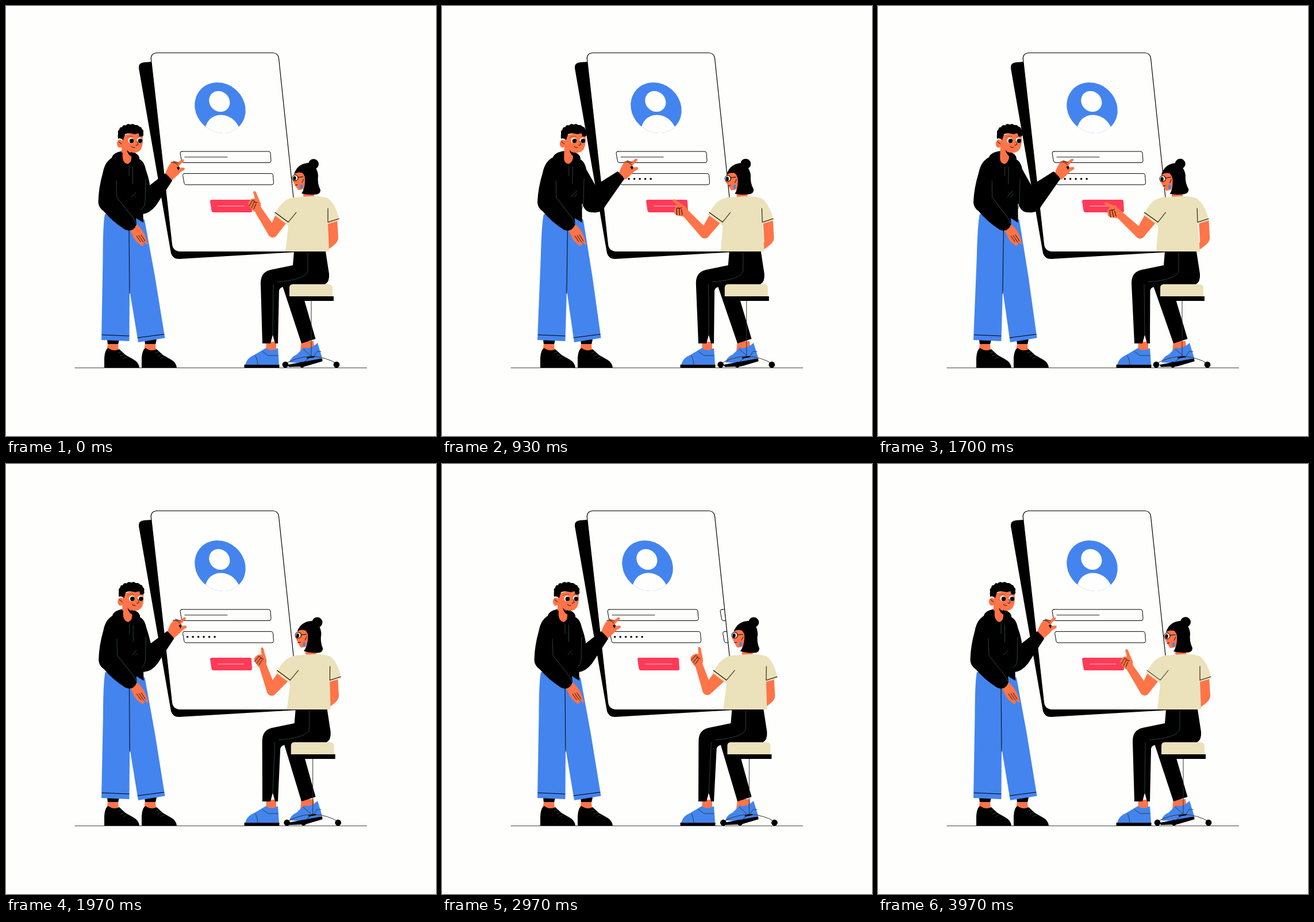
Animation, 748 px wide and 748 px high, one loop 4.01 s. Source, as an HTML page with a canvas:

```html
<!DOCTYPE html>
<html lang="en">
<head>
<meta charset="utf-8">
<title>Sign in together</title>
<style>
  html, body { margin: 0; width: 100%; height: 100%; overflow: hidden; background: #fefefd; }
  canvas { display: block; width: 100%; height: 100%; }
</style>
</head>
<body>
<canvas id="stage" width="748" height="748"></canvas>
<script>
const ctx = document.getElementById('stage').getContext('2d');
const LOOP = 4010;
const BLACK = '#000', WHITE = '#fefefd', BLUE = '#4484ee', SKIN = '#ff7448',
      RED = '#ff3b58', CREAM = '#ebe1ba', SEAM = '#24463f';

// ---------- drawing helpers ----------
function fill(d, color) {
  ctx.fillStyle = color;
  ctx.fill(new Path2D(d));
}
function line(d, color = BLACK, width = 1) {
  ctx.strokeStyle = color;
  ctx.lineWidth = width;
  ctx.stroke(new Path2D(d));
}
function oval(x, y, rx, ry, color) {
  ctx.fillStyle = color;
  ctx.beginPath();
  ctx.ellipse(x, y, rx, ry, 0, 0, 7);
  ctx.fill();
}
const dot = (x, y, r, color) => oval(x, y, r, r, color);

function group(draw, ...matrix) {
  ctx.save();
  if (matrix.length) ctx.transform(...matrix);
  draw();
  ctx.restore();
}
const shift = (dx, draw, dy = 0) => group(draw, 1, 0, 0, 1, dx, dy);
// shifts x by k for each unit above base
const lean = (k, base, draw, dx = 0) => group(draw, 1, 0, -k, 1, k * base + dx, 0);

// tapered segment with round ends
function limb(x1, y1, r1, x2, y2, r2, color) {
  const a = Math.atan2(y2 - y1, x2 - x1);
  ctx.fillStyle = color;
  ctx.beginPath();
  ctx.arc(x1, y1, r1, a + Math.PI / 2, a - Math.PI / 2);
  ctx.arc(x2, y2, r2, a - Math.PI / 2, a + Math.PI / 2);
  ctx.fill();
}

// ---------- timing helpers ----------
const clamp = v => Math.min(1, Math.max(0, v));
const smooth = v => v * v * (3 - 2 * v);
const cubic = v => v < .5 ? 4 * v ** 3 : 1 - 4 * (1 - v) ** 3;

function track(keys, t) {
  let i = 1;
  while (i < keys.length - 1 && t > keys[i][0]) i++;
  const [t0, a] = keys[i - 1], [t1, b] = keys[i];
  const p = smooth(clamp((t - t0) / (t1 - t0)));
  return a.map((v, n) => v + (b[n] - v) * p);
}
const blink = (t, times) => Math.max(0, ...times.map(c => 1 - Math.abs(t - c) / 95));

// ---------- card ----------
const CARD = 'M263 81.5H464Q473 81.5 474.5 91L510 427.5H303Q290 427 288.5 415L252.5 94Q251 82 263 81.5Z';
const FIELD = 'M306 253H457Q459.5 253 460 256L461 269Q461 272.5 458 272.5H309Q306 272.5 305.5 270L303 256Q303 253 306 253Z';

function form(dots) {
  group(() => {
    dot(0, 0, 44, BLUE);
    ctx.beginPath();
    ctx.arc(0, 0, 44, 0, 7);
    ctx.clip();
    dot(0, 43, 30.5, WHITE);
    dot(0, -11, 18, WHITE);
  }, 1, 0, .107, 1, 372.5, 177);
  line(FIELD);
  line('M311 262.8H385', BLACK, .9);
  shift(4.5, () => line(FIELD), 38.4);
  for (let i = 0; i < dots; i++) dot(315.6 + 9.5 * i, 300.8, 1.8, BLACK);
  fill('M358 337H424Q427 337 427 340L428 356Q428 359 425 359H361Q358 359 357.5 356L355 340Q355 337 358 337Z', RED);
  line('M369 348H414', '#ffc4ca', 1.2);
}

function card(t) {
  fill('M231 108Q230 99 240 98L254 97L300 420L505 428L301 440Q290 440 287 430Z', BLACK);
  fill(CARD, WHITE);
  group(() => {
    ctx.clip(new Path2D(CARD));
    const slide = 196 * cubic(clamp((t - 2800) / 640));
    const typed = Math.floor((t - 380) / 85) + 1;
    shift(-slide, () => form(Math.min(6, typed)));
    if (slide) shift(196 - slide, () => form(0));
  });
  line(CARD, BLACK, 1.2);
}

// ---------- man ----------
const MAN = [[0, [0]], [200, [-.45]], [570, [.58]], [900, [1]], [1730, [1]], [2150, [-.45]], [2330, [0]], [LOOP, [0]]];

function manFoot() {
  fill('M176 580H197L195 589H177Z', BLACK);
  fill('M177 588H195L196 600H175Z', SKIN);
  fill('M171 629V612Q172 597 178 595Q187 602 197 597L208 607L222 615Q231 620 232 629Z', BLACK);
  line('M195 604L201 601M199 609L206 606M204 613L211 610', SEAM);
}

function manLegs() {
  fill('M172 362Q168.500 380 168.500 440L166 581L214.500 583L215 494L230 585L276.500 577.500L259 470L241 372L228 362Z', BLUE);
  line('M214 388L215 500M167 572L214 574M229 577L275 571');
}

function manEye(x, lid) {
  if (lid > .85) return line(`M${x - 5} 231Q${x} 229 ${x + 4} 233`, BLACK, .9);
  group(() => {
    ctx.beginPath();
    ctx.ellipse(x, 234 + lid * 1.5, 5, 5 * (1 - lid), 0, 0, 7);
    ctx.clip();
    dot(x, 234, 7, WHITE);
    dot(x + 1.2, 234.8, 4, BLACK);
  });
}

function manHead(lid) {
  oval(198, 239.5, 5, 7, SKIN);
  fill('M202 226Q220 219 237 223Q240 238 235 249Q229 257 219 255L217 274Q208 279 201 270V245Z', SKIN);
  fill('M210 250Q214 256 221 255.500L218.500 262Q212 259 210 250Z', BLACK);
  manEye(217.5, lid);
  manEye(232.5, lid);
  line('M210 229Q215 225 221 227M229 228L236 226', '#a8402a', .9);
  line('M228 235L230 240Q229 243 226 242M218 244Q220 247 224 246M196 236L201 240', BLACK, .9);
  fill('M195 231Q193 215 203 210Q217 203 231 209Q240 214 238 224Q231 220 224 223Q213 220 207 223L204 233Q199 229 195 231Z', BLACK);
  for (let i = 0; i < 10; i++) {
    const a = Math.PI * (.92 + i * .127);
    dot(217 + 18.5 * Math.cos(a), 221 + 12 * Math.sin(a), 4, BLACK);
  }
}

function manTorso(u, lid) {
  fill('M215 388L228 380Q238 389 243 402L247 414Q245 417 241 410L238 418Q228 413 222 403Z', SKIN);
  line('M227 400L234 410M231 399L239 411M235 398L242 409', BLACK, .9);
  fill('M188 262Q172 269 168.500 290Q161 316 160.500 341Q161 351 170 357Q184 374 207 389Q221 395 227 380L226 369L239 377L238 345L250 310Q245 280 230 264Z', BLACK);
  shift(1.5 * u, () => oval(208, 265, 24, 13, BLACK));
  shift(4 * u, () => manHead(lid));
  shift(1.5 * u, () => fill('M203 255Q185 257 183 269Q195 287 214 283Q232 280 232 264Q228 256 217 254Q223 268 212 275Q201 273 203 255Z', BLACK));
  line('M192 304L193 333L216 362Q224 371 226 379M214 278V295M220.500 280V309M219 332L232 318M225 332L229 327', SEAM);
}

function manArm(u) {
  const e = 28 * u, s = 8 * u, y = 3 * u;
  fill(`M${226 + s} 264Q${240 + s} 267 ${243 + s} 284L${250 + e * .6} 312
    L${277 + e} ${291 - y}Q${286 + e} ${294 - y} ${289 + e} ${304 - y}
    L${261 + e * .85} 347Q${250 + e} 361 ${237 + e * .95} ${362 - y}Q${229 + e * .8} 360 ${227 + e * .7} 350L${226 + s} 320Z`, BLACK);
  line(`M${243 + s * .5} 301L${242 + s * .5} 342Q${241 + s * .5} 350 ${235 + s} 354`, SEAM);
  shift(30.5 * u, () => {
    fill('M277.500 291Q282 277 288 272Q293 269 299 272L306 267Q311 266 309 270L302 277L299 282L309 281Q313 283 309 286Q303 288 300 293L289 303Z', SKIN);
    fill('M297 281Q302 277 302 282L300 286Z', BLACK);
    line('M287 272Q294 271 299 277M291 270L300 273', BLACK, .9);
  }, -u);
}

function man(t) {
  const [u] = track(MAN, t);
  const lid = blink(t, [570, 2375, 3315]);
  manFoot();
  shift(65, manFoot);
  lean(.023 * u, 580, () => {
    manLegs();
    manTorso(u, lid);
  });
  manArm(u);
}

// ---------- woman ----------
// seat, shoulders, elbow x y, wrist x y, hand turn, head shift, head turn
const REST  = [0, 0, 464, 394, 437, 352, 0, 0, 0];
const BACK  = [4, 6, 464, 394, 454, 346, .38, 6.5, .08];
const PRESS = [-2, -5, 456, 396, 418, 361, -.72, -6, -.06];
const SWIPE = [0, -5, 449, 389, 407, 361, -.72, -5, -.12];
const WOMAN = [[0, REST], [320, BACK], [570, REST], [840, PRESS], [1250, BACK], [1695, PRESS], [2090, BACK],
  [2330, [0, .5, 464, 394, 440, 351, .03, 0, 0]], [2560, PRESS], [2880, BACK], [3240, SWIPE], [3590, BACK], [3880, REST], [LOOP, REST]];

function womanLegs(c) {
  fill('M514 583H535L537 598L512 600Z', SKIN);
  fill('M493 620Q495 611 506 606L518 594Q529 598 542 586L550 612L530 622Z', BLUE);
  fill('M490 624L550 613L550.500 618L520 627L492 628Z', BLACK);
  line('M517 597L530 608M534 612L541 601L548 601', SEAM);
  fill('M453 584H470V600H452Z', SKIN);
  fill('M416 624Q419 612 432 607L452 595Q461 602 473 595L475 624Z', BLUE);
  fill('M414.500 624H475.500V629H414.500Z', BLACK);
  line('M446 601L456 608H473M434 608Q438 616 438 624', SEAM);
  fill(`M${481 + c} 487L${503 + c} 480L${519 + c * .3} 512L538.500 579L514 587Z`, BLACK);
  fill(`M${501 + c} 427H${556 + c}L${562 + c} 466Q${563 + c} 480 ${555 + c} 484L${493 + c} 489
    Q${477 + c} 486 ${475 + c * .8} 495L473 587H468L464 572L460 587H446L${443 + c} 482
    Q${443 + c} 463 ${460 + c} 459L${499 + c} 451Z`, BLACK);
  line(`M${525 + c} 430V460Q${523 + c} 476 ${472 + c} 480M${465 + c} 484L464 572`, SEAM);
}

function chair() {
  line('M531 513V610M486 622Q505 611 531 609Q558 611 575 622M531 609L515 622', '#333');
  line('M524 612L536 610', BLACK, 2);
  fill('M493 505V490Q493 484 499 484H561Q568 484 568 491V505Z', CREAM);
  fill('M493 505H570V513H497Z', BLACK);
  dot(486, 624, 5.4, BLACK);
  dot(515, 624, 5, BLACK);
  dot(575, 624, 5.4, BLACK);
}

const restingArm = () =>
  fill('M559 376L576 370L578 403Q578 411 568 418L556 427L557 418L561 410Z', SKIN);

function shirt() {
  fill('M500 333Q485 336 477 347L466 363L490 381L491 384L486 427H562L560 379L580 373Q573 343 559 334Q545 330 530 331Z', CREAM);
  line('M468 359L491 376L505 359M560.500 376L579 370M560 352V376');
}

function womanArm(ex, ey, wx, wy, turn) {
  limb(wx, wy, 6.5, ex, ey, 8.5, SKIN);
  group(() => {
    ctx.rotate(turn);
    fill('M7 4L6 -9Q2 -17 -2 -28Q-5 -32 -7 -28L-4 -17Q-11 -19 -16 -9Q-16 -4 -12 -1L-6 5Z', SKIN);
    line('M-14 -4L-8 -14L-4 -12M-10 -1L-5 -11L0 -10M-6 1L-2 -8', BLACK, .9);
  }, 1, 0, 0, 1, wx, wy);
}

function womanHead(lid) {
  fill('M517 308H536V333Q526 337 517 331Z', SKIN);
  fill('M502 288L521 286L522 312Q517 321 508 320L503 312L498 303L501 297Z', SKIN);
  fill('M501 293Q506 275 525 273Q541 276 543 295Q541 308 547 320Q547 328 537 328Q524 329 514 326Q520 318 520 304Q521 295 515 290Q506 288 501 293Z', BLACK);
  dot(535, 275, 9, BLACK);
  oval(516.500, 304, 3.500, 6, SKIN);
  line('M515 307L518 301', BLACK, .9);
  oval(514, 314, 2.200, 4, BLUE);
  if (lid < .85) {
    oval(502.500, 299, 4.500, 4.500 * (1 - lid), WHITE);
    oval(502, 299.500, 2.600, 3.600 * (1 - lid), BLACK);
  } else line('M499 299H505');
  ctx.strokeStyle = BLACK;
  ctx.lineWidth = 1;
  ctx.beginPath();
  ctx.arc(503, 299, 5.200, 0, 7);
  ctx.stroke();
  line('M508 298L517 297M503 312L507 311');
}

function woman(t) {
  const [c, top, ex, ey, wx, wy, turn, hx, hr] = track(WOMAN, t);
  womanLegs(c);
  shift(c, chair);
  shift(c * .4, restingArm);
  limb(480 + top, 368, 12, ex, ey, 8.5, SKIN);
  womanArm(ex, ey, wx, wy, turn);
  group(() => {
    ctx.translate(527 + hx, 330);
    ctx.rotate(hr);
    ctx.translate(-527, -330);
    womanHead(blink(t, [1270, 2375, 3270]));
  });
  lean((top - c) / 75, 426, shirt, c);
}

// ---------- loop ----------
function draw(t) {
  ctx.fillStyle = WHITE;
  ctx.fillRect(0, 0, 748, 748);
  line('M120 629.500H627.500', '#444');
  card(t);
  man(t);
  woman(t);
}

ctx.lineJoin = ctx.lineCap = 'round';
const start = performance.now();
function tick() {
  draw((performance.now() - start) % LOOP);
  requestAnimationFrame(tick);
}
tick();
</script>
</body>
</html>
```
